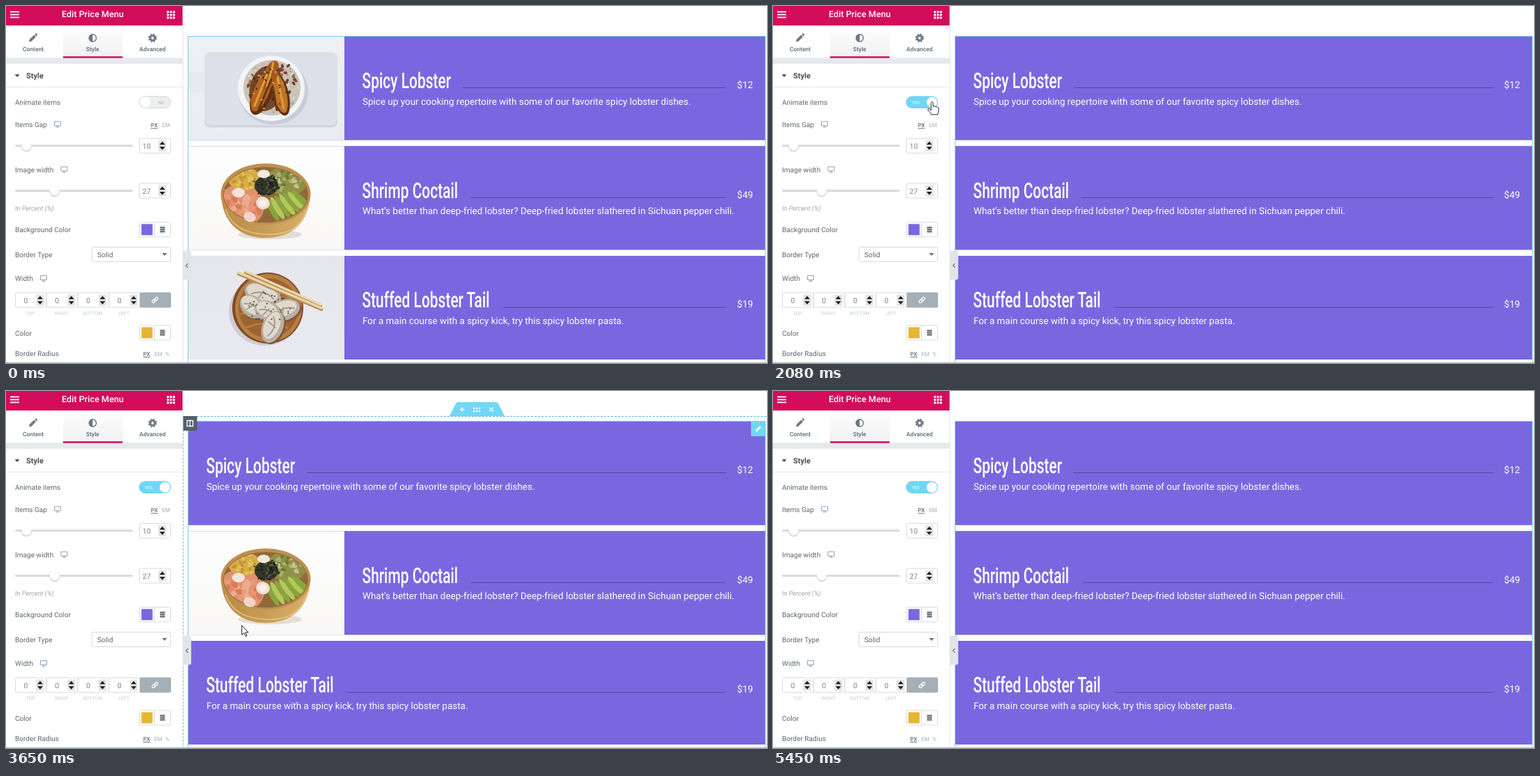
An HTML page for the animation above (5.83 s loop, 1093 px wide and 513 px high).

```html
<!DOCTYPE html>
<html lang="en">
<head>
<meta charset="utf-8">
<title>Price Menu</title>
<style>
  html, body { margin: 0; width: 100%; height: 100%; overflow: hidden; background: #fff; }
  svg { display: block; }
  text { font-family: Roboto, sans-serif; text-rendering: geometricPrecision; white-space: pre; }
</style>
</head>
<body>
<svg id="stage" width="100%" height="100%" viewBox="0 0 1093 513"></svg>
<script>
const LOOP = 5830, SLIDE = 300, IMG = 224;
const PURPLE = '#7a67e0', CYAN = '#71d7f7', RED = '#d30c5c', LINE = '#d5dadf', GREY = '#5d6871', MUTE = '#a4afb7';

// Drawing helpers; text is centred vertically on y
const text = (x, y, s, size = 10.1, fill = GREY, more = '') =>
  `<text x="${x}" y="${y + size * .355}" font-size="${size}" fill="${fill}" ${more}>${s}</text>`;
const rect = (x, y, w, h, fill, more = '') =>
  `<rect x="${x}" y="${y}" width="${w}" height="${h}" fill="${fill}" ${more}/>`;
const oval = (x, y, rx, ry, fill, turn = 0, more = '') =>
  `<ellipse rx="${rx}" ry="${ry}" fill="${fill}" transform="translate(${x} ${y}) rotate(${turn})" ${more}/>`;
const path = (d, fill, more = '') => `<path d="${d}" fill="${fill}" ${more}/>`;
const stroke = (d, color, width = 1, more = '') =>
  path(d, 'none', `stroke="${color}" stroke-width="${width}" ${more}`);
const MID = 'text-anchor="middle" ', BOLD = 'font-weight="500" ';
const box = (x, y, w, h) => rect(x + .5, y + .5, w - 1, h - 1, '#fff', `rx="2" stroke="${LINE}"`);

let seed = 7;
const rnd = () => (seed = seed * 16807 % 2147483647) / 2147483647;
function specks(n, x, y, rx, ry, size, colors) {
  let out = '';
  for (let i = 0; i < n; i++) {
    const a = rnd() * 6.283, r = Math.sqrt(rnd());
    out += oval((x + Math.cos(a) * r * rx).toFixed(1), (y + Math.sin(a) * r * ry).toFixed(1),
      size, size * .6, colors[i % colors.length], Math.round(rnd() * 180));
  }
  return out;
}

// Dishes, each on a 224 x 150 picture
function lobster() {
  return rect(0, 0, IMG, 150, 'url(#cool)') +
    rect(0, 51, 30, 30, '#e6e9ef') +
    rect(23, 25, 191, 106, '#cfd4de', 'rx="8"') +
    rect(23, 23, 191, 105, '#dde0e9', 'rx="8"') +
    oval(122, 80, 50, 47, '#c8cdd8') + oval(119, 75, 48, 47, '#f3f4f6') +
    oval(120, 74, 41, 40, '#cbc3ba') +
    specks(130, 120, 74, 39, 38, 1.9, ['#e6e0d8', '#a99d90', '#c6bbb0']) +
    oval(112, 75, 24, 33, '#70482a', 14) +
    specks(26, 137, 62, 17, 24, 3, ['#943a29', '#57452f', '#7c7549']) +
    specks(22, 95, 76, 11, 24, 2.8, ['#7d3a24', '#4f3b25', '#a2693a']) +
    oval(106, 82, 14, 33, '#5f3014', 22) + oval(105, 79, 11, 31, '#b2651f', 22) +
    oval(132, 83, 12, 32, '#633014', -14) + oval(131, 81, 9.5, 30, '#bd7424', -14) +
    oval(118, 56, 10, 22, '#a35a20', 20) +
    stroke('M113 55L95 100M128 59L137 104M122 38L113 72', '#df9c3d', 3, 'stroke-linecap="round"') +
    stroke('M119 62L101 105M121 72L127 106', '#6a3413', 3, 'stroke-linecap="round"') +
    specks(34, 117, 76, 26, 32, 1.8, ['#4a2410', '#58502a', '#d99f49']);
}
function shrimp() {
  let slices = '';
  for (let i = 0; i < 7; i++)
    slices += oval(121 + i * 7, 92 - i * 2.4, 4.3, 19, i % 2 ? '#b3c75c' : '#88a63b', -28 - i * 3);
  return rect(0, 0, IMG, 150, 'url(#warm)') +
    oval(117, 127, 46, 7, '#e3ddd5') +
    path('M47 66C47 112 76 132 111 132S175 112 175 66Z', 'url(#gold)') +
    oval(111, 69, 64.5, 44, '#bd9050') + oval(111, 70, 61, 40, '#91693a') +
    `<g clip-path="url(#bowl)">` +
    oval(75, 86, 34, 31, '#e0906f') + specks(32, 74, 87, 29, 24, 6, ['#eeac8d', '#d97c58', '#e79a78']) +
    oval(80, 47, 23, 17, '#d6ac45') + specks(28, 82, 47, 21, 14, 2.8, ['#e8c45a', '#bd9138']) +
    oval(142, 50, 29, 22, '#8f9149') + specks(30, 146, 48, 23, 17, 4, ['#a9b162', '#6f7a38', '#cdbd92']) +
    slices + '</g>' +
    oval(112, 57, 17, 14, '#34352b') + specks(44, 112, 57, 19, 16, 2.2, ['#26271f', '#56603f', '#1c1d17']) +
    oval(107, 82, 10, 9, '#f3dfd7', 20) + oval(107, 82, 6, 5, '#faf0e9') +
    oval(72, 67, 9, 7, '#f4e3da') + oval(108, 40, 9, 6, '#f3e8dc') + oval(88, 102, 9, 7, '#f2d3c7', 20) +
    stroke('M53 91C63 119 86 126 114 127S162 118 171 89', '#efcf93', 2, 'opacity=".6"');
}
function dumpling(x, y, rx, ry, turn) {
  return oval(x + 2, y + 2, rx, ry, '#7b5534', turn) + oval(x, y, rx, ry, '#b9aea2', turn) +
    oval(x - 1, y - 2, rx * .85, ry * .72, '#dfd8ce', turn) +
    `<g transform="translate(${x} ${y}) rotate(${turn})">` +
    stroke(`M${-rx * .6} ${ry * .3}Q0 ${-ry * .5} ${rx * .65} ${ry * .15}M${-rx * .2} ${ry * .6}L0 ${-ry * .3}`, '#a39688', 1.8) + '</g>';
}
function tail() {
  return rect(0, 0, IMG, 150, 'url(#mist)') +
    oval(110, 80, 52, 49, '#aaa9b4', 0, 'opacity=".45"') +
    oval(114, 75, 51, 51, '#7c4a24') + oval(115, 75, 48, 49, '#b87d43') + oval(115, 75, 43, 43, '#9c6432') +
    stroke('M75 67Q104 50 149 62M74 84Q110 72 154 86M83 103Q112 91 143 104', '#b98346', 2) +
    dumpling(107, 55, 27, 16, 18) + dumpling(92, 73, 20, 15, 40) +
    dumpling(137, 78, 24, 15, -17) + dumpling(114, 80, 20, 15, 30) + dumpling(121, 102, 24, 15, 112) +
    specks(30, 117, 74, 30, 24, 1.4, ['#4b3d2d', '#75644d']) +
    stroke('M72 26L191 77M82 24L190 72', '#b8915d', 4.4, 'stroke-linecap="round"') +
    stroke('M72 24L191 75M82 22L190 70', '#ecd7ac', 3.4, 'stroke-linecap="round"');
}

const rows = [
  { title: 'Spicy Lobster', dots: 144, price: '$12', pic: lobster, flips: [1350, 2255, 2940],
    note: 'Spice up your cooking repertoire with some of our favorite spicy lobster dishes.' },
  { title: 'Shrimp Coctail', dots: 156, price: '$49', pic: shrimp, flips: [1350, 2967, 3725],
    note: 'What’s better than deep-fried lobster? Deep-fried lobster slathered in Sichuan pepper chili.' },
  { title: 'Stuffed Lobster Tail', dots: 202, price: '$19', pic: tail, flips: [1350, 3750, 5110],
    note: 'For a main course with a spicy kick, try this spicy lobster pasta.' }
];

function menuRow(r, i) {
  // the titles share one condensed setting
  return `<svg x="262" y="${43.4 + 157.8 * i}" width="828.5" height="149.1">
    ${rect(0, 0, 829, 150, PURPLE)}
    <g id="slide${i}">${r.pic()}${rect(IMG, 0, 829, 150, PURPLE)}
      <text transform="translate(249.5 74.4) scale(.675 1)" font-size="31" font-weight="500" fill="#fff">${r.title}</text>
      ${text(250, 93.4, r.note, 13.47, '#fff')}
    </g>
    <line id="dots${i}" y1="74.1" x2="772" y2="74.1" stroke="#51488f" stroke-width="1"/>
    ${text(811, 69.6, r.price, 13.6, '#fff', 'text-anchor="end"')}</svg>`;
}

// Side panel
const monitor = (x, y) => stroke(`M${x - 4.5} ${y - 4}h9v6h-9zM${x - 2.5} ${y + 4}h5M${x} ${y + 2}v2`, '#8ea2bb');
const spinner = (x, y) => rect(x - 5.5, y - 8, 11, 16, '#e4e4e4') +
  path(`M${x - 4} ${y - 1.5}l4-4.5 4 4.5zM${x - 4} ${y + 1.5}l4 4.5 4-4.5z`, '#1c1c1c');
const units = (x, y, list) => list.map((u, i) =>
  text(x + i * 16, y, u, 8, i ? MUTE : GREY, i ? '' : BOLD)).join('') + rect(x, y + 4, 10, .9, GREY);
const slider = (y, knob, value) => rect(13, y - 1.5, 169, 3, LINE, 'rx="1.5"') +
  oval(knob, y + .8, 7.6, 7.6, '#c9ced3') + oval(knob, y, 7, 7, '#fff') +
  box(191, y - 11, 46, 22) + text(202, y + .5, value, 10.5, '#7b858d', MID) + spinner(224.5, y);
const swatch = (y, color) => box(191, y - 11, 46, 22) + rect(194.5, y - 8, 16, 16, color) +
  rect(213, y - 10, 1, 20, LINE) +
  [-3, 0, 3].map(d => rect(221, y + d - 1.2, 7.5, 2.4, '#6d7882', 'rx="1"')).join('');

function panel() {
  let s = rect(0, 0, 254, 513, '#fff') + rect(0, 0, 254, 28, RED);
  for (let i = 0; i < 3; i++) {
    s += rect(6, 7.5 + i * 4, 13, 1.8, '#fff');
    for (let j = 0; j < 3; j++) s += rect(231 + j * 4.3, 7 + i * 4.2, 3, 3, '#fff');
  }
  s += text(124.5, 11.8, 'Edit Price Menu', 12.65, '#fff', MID + BOLD);
  // tabs
  s += rect(82, 28, 85.5, 45, 'url(#tab)') + rect(0, 74.5, 254, 8.5, '#e6e9ec') + rect(82, 72.3, 85.5, 2.5, RED);
  [['Content', 39], ['Style', 124.5], ['Advanced', 210.5]].forEach(([name, x]) =>
    s += text(x, 62, name, 8.5, GREY, MID + BOLD));
  s += path('M33 51.5l.8-3.5 6.6-6.6 2.7 2.7-6.6 6.6zM41.2 40.6l1-1q.8-.6 1.5 0l1.2 1.2q.6.7 0 1.5l-1 1z', '#6d7882') +
    oval(124.5, 46, 5.2, 5.2, 'none', 0, 'stroke="#6d7882" stroke-width="1.5"') +
    path('M124.5 40.8a5.2 5.2 0 0 0 0 10.4z', '#6d7882') +
    oval(210.5, 46, 3.3, 3.3, 'none', 0, 'stroke="#6d7882" stroke-width="2.8"') +
    oval(210.5, 46, 5.2, 5.2, 'none', 0, 'stroke="#6d7882" stroke-width="2" stroke-dasharray="2.5 1.58"');
  s += path('M12.5 98.3h7l-3.5 4z', '#495157') + text(29, 100, 'Style', 11, '#495157', 'font-weight="700"') +
    rect(0, 116, 254, 1, '#e6e9ec');

  s += text(13, 138, 'Animate items');
  s += `<rect id="switch" x="191.5" y="130" width="45" height="16.5" rx="8.2"/>` +
    text(223, 138.6, 'NO', 6, MUTE, 'id="no" ' + MID) + text(205, 138.6, 'YES', 6, '#fff', 'id="yes" ' + MID) +
    `<circle id="knob" cy="138.3" r="7.6" fill="#fff"/>`;
  s += text(13, 170, 'Items Gap') + monitor(74, 170) + units(208, 171.5, ['PX', 'EM']) + slider(200.8, 29.5, 10);
  s += text(13, 235, 'Image width') + monitor(83.5, 235) + slider(265.5, 70, 27);
  s += text(13, 291, 'In Percent (%)', 9.3, '#9aa5ad', 'font-style="italic"');
  s += text(13, 321.5, 'Background Color') + swatch(321.3, PURPLE);
  s += text(13, 357, 'Border Type') + box(123, 346, 114, 22) + text(131, 357, 'Solid', 10.3) +
    path('M224 355h7.5l-3.75 4z', '#6d7882');
  s += text(13, 391.5, 'Width') + monitor(54, 391.5);
  ['TOP', 'RIGHT', 'BOTTOM', 'LEFT'].forEach((side, i) => {
    const x = 13 + i * 44.8;
    s += box(x, 411.5, 45.5, 22) + text(x + 15.5, 423, 0, 10.5, '#7b858d', MID) + spinner(x + 36, 422.7) +
      text(x + 22, 442, side, 6.9, '#c2cbd2', MID);
  });
  s += rect(192, 411.5, 45, 22, MUTE, 'rx="2"') +
    `<g transform="translate(214 422.5) rotate(-42)" fill="none" stroke="#fff" stroke-width="1.4">
      <rect x="-5" y="-1.8" width="5.6" height="3.6" rx="1.8"/><rect x="-.6" y="-1.8" width="5.6" height="3.6" rx="1.8"/></g>`;
  s += text(13, 470, 'Color') + swatch(469.5, '#e6b633');
  s += text(13, 499.5, 'Border Radius') + units(197, 500, ['PX', 'EM', '%']);
  return s + rect(253.5, 0, 1, 513, '#e3e6e9') + rect(0, 512, 1093, 1, '#b9bdc1');
}

function handles() {
  let s = stroke('M254 36.5H1093M254.5 36V513', '#4fb6d3', 1.2, 'stroke-dasharray="3 2"') +
    path('M637 36L645.5 19Q647 16 650 16H703Q706 16 707.5 19L716 36Z', CYAN) +
    stroke('M652 26.5h6.5M655.2 23.2v6.5M694.3 23.5l6 6M700.3 23.5l-6 6', '#fff', 1.3);
  for (let i = 0; i < 6; i++) s += rect(671 + i % 3 * 4, 23.7 + (i / 3 | 0) * 4, 2.4, 2.4, '#fff');
  return s + rect(254, 36, 20.5, 21, '#556068') + stroke('M260 42.5h8.5v8h-8.5zM264.2 42v9', '#fff', 1.3) +
    rect(1070, 44, 21, 21, CYAN) + path('M1076.5 58.5l.7-2.8 5.5-5.5 2.1 2.1-5.5 5.5z', '#fff');
}

const grad = (id, a, b, dir = 'x2="0" y2="1"') =>
  `<linearGradient id="${id}" ${dir}><stop stop-color="${a}"/><stop offset="1" stop-color="${b}"/></linearGradient>`;
const $ = id => document.getElementById(id);

$('stage').innerHTML = `<defs>
    ${grad('cool', '#eef0f4', '#e9ecf1')}${grad('warm', '#fdfdfd', '#f9f8f7')}
    ${grad('mist', '#e6e7ed', '#e9eaef')}
    ${grad('gold', '#b98a45', '#d8b06a', '')}${grad('tab', '#ffffff', '#f0f0f1')}
    <clipPath id="bowl"><ellipse cx="111" cy="70" rx="60" ry="39"/></clipPath></defs>
  ${rect(0, 0, 1093, 513, '#fff')}
  ${rows.map(menuRow).join('')}
  ${stroke('M261.5 513V43.5H1090.8V513', '#7fc9ee')}
  <g id="handles">${handles()}</g>
  ${panel()}
  ${path('M254 351.5h9q3 0 3 3v36q0 3-3 3h-9z', '#e2e5e8')}${stroke('M261.5 369.8l-3 3.2 3 3.2', '#6d7882', 1.2)}
  <g id="cursor" stroke="#222" stroke-width="1" stroke-linejoin="round">
    ${path('M0 0v13.5l3.1-2.8 2.3 5 2-.9-2.2-4.9h4.2z', '#fff', 'id="arrow"')}
    ${path('M-2 1.5c0-2 3-2 3 0v5c1.5-1.2 2.6-.6 2.9.4 1-.8 2.3-.3 2.6.7 1.3-.5 2.4.2 2.4 1.6v4c0 2-1.3 3-1.5 5H-1.5c-1-3-4-4.5-5-7-.3-1.6 1.5-2.2 2.8-.6l1.7 1.8z', '#fff', 'id="hand"')}
  </g>`;

const clamp = v => Math.max(0, Math.min(1, v));
// the CSS "ease" curve
function ease(x) {
  if (x <= 0 || x >= 1) return clamp(x);
  let lo = 0, hi = 1, u;
  for (let i = 0; i < 20; i++) {
    u = (lo + hi) / 2;
    if (.75 * u * (1 - u) + u ** 3 < x) lo = u; else hi = u;
  }
  return .3 * u * (1 - u) ** 2 + 3 * u * u * (1 - u) + u ** 3;
}

// time, x, y of the pointer tip
const stops = [
  [150, 720, 500], [300, 590, 410], [500, 370, 240], [640, 262, 165], [700, 241, 147], [790, 241, 147],
  [840, 234, 142], [930, 221, 130], [1000, 216, 126], [1070, 223, 137], [2050, 223, 137],
  [2250, 262, 142], [2400, 300, 146], [2540, 309, 150], [2760, 313, 158], [2950, 326, 195],
  [3100, 342, 270], [3240, 346, 290], [3450, 345, 296], [3735, 336, 354], [3950, 330, 422],
  [4050, 329, 431], [4340, 329, 431], [4600, 530, 458], [4910, 798, 497], [5100, 850, 514]
];
function pointer(t) {
  const i = stops.findIndex(k => k[0] > t);
  if (i < 1) return null;
  const [a, x, y] = stops[i - 1], [b, u, v] = stops[i], p = (t - a) / (b - a);
  return [x + (u - x) * p, y + (v - y) * p];
}

const show = (id, on) => $(id).setAttribute('visibility', on ? 'visible' : 'hidden');

function draw(t) {
  rows.forEach((r, i) => {
    const shut = r.flips.reduce((sum, at, n) => sum + (n % 2 ? -1 : 1) * ease((t - at) / SLIDE), 0);
    const shift = -IMG * shut;
    $('slide' + i).setAttribute('transform', `translate(${shift.toFixed(2)} 0)`);
    $('dots' + i).setAttribute('x1', 250 + shift + r.dots);
  });

  const on = ease((t - 1200) / 200);
  $('switch').setAttribute('fill', on > .5 ? CYAN : '#eceeef');
  $('switch').setAttribute('stroke', on > .5 ? '#62cbec' : '#d3d6d9');
  $('knob').setAttribute('cx', 200 + 28.3 * on);
  show('no', on <= .5);
  show('yes', on > .5);

  const p = pointer(t);
  show('cursor', p);
  show('handles', p && p[0] > 254);
  const hand = p && p[0] < 237;
  $('arrow').style.display = hand ? 'none' : '';
  $('hand').style.display = hand ? '' : 'none';
  if (p) $('cursor').setAttribute('transform', `translate(${p[0].toFixed(1)} ${p[1].toFixed(1)})`);
}

const start = performance.now();
function tick() {
  draw((performance.now() - start) % LOOP);
  requestAnimationFrame(tick);
}
tick();
</script>
</body>
</html>
```
